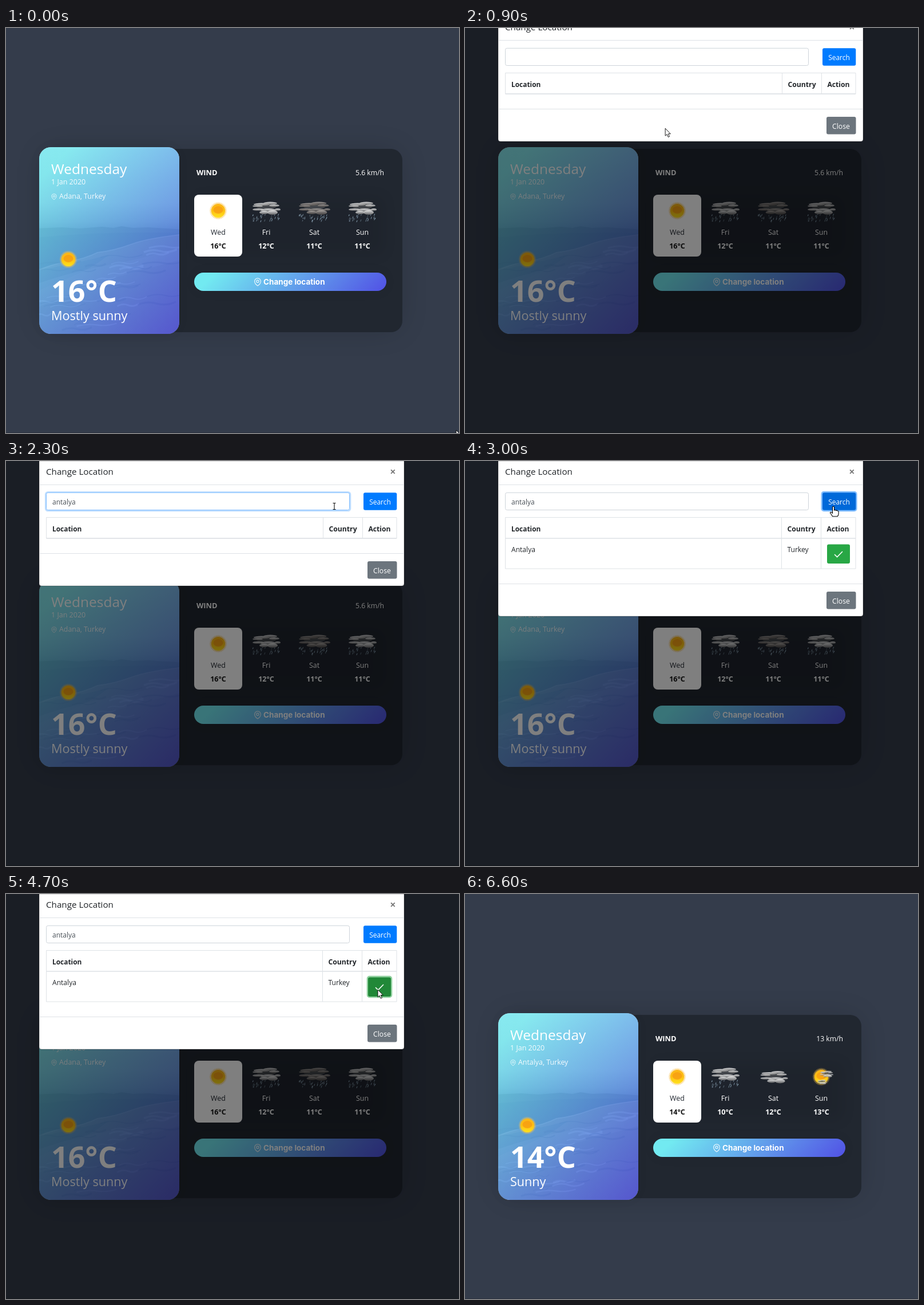
An HTML page for the animation above (6700 ms loop, 792 px wide and 707 px high).

```html
<!DOCTYPE html>
<html lang="en">
<head>
<meta charset="utf-8">
<title>Weather card</title>
<style>
html, body { margin: 0; width: 100%; height: 100%; overflow: hidden; background: #343c4b; }
svg { display: block; }
text { font-family: "Open Sans", "Noto Sans", sans-serif; white-space: pre; }
.b { font-weight: 700; }
.m { text-anchor: middle; }
.e { text-anchor: end; }
</style>
</head>
<body>
<svg id="stage" width="792" height="707" viewBox="0 0 792 707"></svg>
<script>
const LOOP = 6700, STEP = 100;
const stage = document.getElementById('stage');

// ---------- helpers ----------
const clamp = v => Math.max(0, Math.min(1, v));
const ease = v => { v = clamp(v); return v * v * (3 - 2 * v); };
const range = (n, f) => Array.from({ length: n }, (_, i) => f(i)).join('');
function seeded(s) {
  return () => (s = (s * 16807) % 2147483647) / 2147483647;
}
const text = (x, y, size, str, fill = '#fff', cls = '', more = '') =>
  `<text x="${x}" y="${y}" font-size="${size}" fill="${fill}" class="${cls}" ${more}>${str}</text>`;
const box = (x, y, w, h, r, fill, more = '') =>
  `<rect x="${x}" y="${y}" width="${w}" height="${h}" rx="${r}" fill="${fill}" ${more}/>`;
const line = (d, stroke = '#dee2e6', w = 1, more = '') =>
  `<path d="${d}" fill="none" stroke="${stroke}" stroke-width="${w}" ${more}/>`;
const oval = (x, y, rx, ry, fill, more = '') =>
  `<ellipse cx="${x}" cy="${y}" rx="${rx}" ry="${ry}" fill="${fill}" ${more}/>`;
const pin = (x, y, s) => `<g transform="translate(${x} ${y}) scale(${s})" fill="none" stroke="#fff" stroke-width="2" opacity=".85">
  <path d="M21 10c0 7-9 13-9 13s-9-6-9-13a9 9 0 0 1 18 0z"/><circle cx="12" cy="10" r="3.5"/></g>`;

// ---------- weather icons ----------
function sun(x, y) {
  const rays = range(32, i => {
    const a = i * Math.PI / 16;
    return `M${x + 12 * Math.cos(a)} ${y + 12 * Math.sin(a)}L${x + 14.3 * Math.cos(a)} ${y + 14.3 * Math.sin(a)}`;
  });
  return oval(x, y, 16, 16, 'url(#glow)') + line(rays, '#f6b93c', 1, 'opacity=".6"') +
    oval(x, y, 12, 12, 'url(#sun)') +
    oval(x, y - 1.5, 8.5, 6.5, '#f79a12', 'opacity=".75" filter="url(#soft)"');
}

// thin streaks of vapour: x, y, rx, ry
const PUFFS = [[0, -2, 17, 4], [-8, -6, 14, 2.5], [7, -8, 12, 2.5], [14, -4, 9, 2], [-15, -3, 9, 1.6],
  [-14, 3, 10, 2], [4, 4, 14, 3], [-4, 8, 8, 3], [11, 8, 9, 4], [20, 3, 5, 2]];
const cloud = (x, y, sx = 1, sy = 1, fill = 'puff') =>
  `<g transform="translate(${x} ${y}) scale(${sx} ${sy})" filter="url(#soft)">` +
  PUFFS.map((p, i) => oval(...p, i ? `url(#${fill})` : '#4b4d50', 'opacity=".85"')).join('') + '</g>';

function rain(x, half, seed) {
  const rnd = seeded(seed);
  return range(32, () => {
    const px = x + (rnd() * 2 - 1) * half, py = 324 + rnd() * 12, len = 2 + rnd() * 2.5;
    return line(`M${px} ${py}l${-len * .35} ${len}`, '#9fbace', .9, `opacity="${.35 + rnd() * .6}"`);
  });
}

const ICONS = {
  sun: x => sun(x, 319),
  rain: x => rain(x, 23, 77) + cloud(x, 314),
  storm: x => rain(x, 26, 191) + cloud(x, 314, 1.12, 1, 'gloom'),
  cloud: x => cloud(x + 1, 319, .98, .95),
  partly: x => sun(x, 319) + cloud(x + 9, 314, .48, .5) + cloud(x + 1, 328, .35, .35)
};

// ---------- page ----------
function photo() {
  const rnd = seeded(4242);
  const waves = range(44, i => {
    const x = 50 + rnd() * 200, y = 412 + i * 2.9 - (x - 58) * .16, w = 25 + rnd() * 50;
    return line(`M${x} ${y}q${w * .25} ${-4 - rnd() * 3} ${w * .5} -2t${w * .5} -3`,
      i % 2 ? '#dce6f0' : '#182840', 1 + rnd() * 2.5, 'opacity=".35"');
  });
  return `<g clip-path="url(#card)">
    <rect x="58" y="208" width="246" height="326" fill="url(#sky)"/>
    <g filter="url(#soft)">
    <path d="M50 350l48 -2 30 2 40 -3 20 2 14 -3 20 3 26 -1 65 4V544H50z" fill="#3a5560"/>
    <path d="M50 366Q180 354 314 358V544H50z" fill="#2b4858"/>
    <path d="M314 359Q248 366 218 377T160 391Q138 402 108 407T50 424V544H314z" fill="#686b70"/>
    <path d="M50 426Q90 416 120 410T180 396Q150 420 110 436T50 462z" fill="#3c5563" opacity=".7"/>
    <path d="M50 448Q120 424 178 414T314 380V402Q230 425 190 436T50 490z" fill="#85888e" opacity=".5"/>
    ${line('M304 361Q248 367 218 378T160 392Q138 403 108 408T58 423', '#e4edf2', 1.5, 'opacity=".25"')}
    ${waves}</g>
    <rect x="58" y="208" width="246" height="326" fill="url(#tint)" opacity=".8"/></g>`;
}

function weather(id, place, wind, sky, days) {
  const names = ['Wed', 'Fri', 'Sat', 'Sun'];
  return `<g id="${id}">` +
    text(93, 297.5, 12.4, place + ', Turkey', '#fff', '', 'opacity=".92"') +
    text(79, 478, 52, days[0][1] + '°C', '#fff', 'b') +
    text(79, 510, 21.6, sky) +
    text(661, 257, 12.2, wind + ' km/h', '#fff', 'e') +
    days.map(([icon, temp], i) => {
      const x = 371 + 84 * i, ink = i ? '#fff' : '#222831';
      return ICONS[icon](x) + text(x, 360.5, 12.4, names[i], ink, 'm') +
        text(x, 384.7, 12.5, temp + '°C', i ? '#fff' : '#111', 'b m');
    }).join('') + '</g>';
}

function table(id, shift, row) {
  const c1 = 554.5 - shift, c2 = 623.5 - shift, end = 135 + row, close = 175 + row;
  const result = row ? text(81, 159, 12.1, 'Antalya', '#212529') + text(c1 + 10, 159, 12.1, 'Turkey', '#212529') +
    box(631.7, 143.7, 42.6, 36.6, 4, '#28a745', 'id="okRing" opacity=".5" stroke="#28a745" stroke-width="2"') +
    box(633, 145.5, 40, 33.5, 3, '#28a745', 'id="ok"') +
    line('M646 163l4.6 4.6 9.4 -9.6', '#fff', 1.5) : '';
  return `<g id="${id}">` +
    `<path d="M58 0H696V${214 + row}q0 4 -4 4H62q-4 0 -4 -4z" fill="#fff" stroke="#0004"/>` +
    line(`M70.5 98.5H683V${end}H70.5zM${c1} 98.5V${end}M${c2} 98.5V${end}`) +
    line('M70.5 135H683', '#dee2e6', 1.6) +
    line(`M58 ${161.5 + row}H696`) +
    text(81, 122.5, 11.9, 'Location', '#212529', 'b') +
    text(c1 + 10, 122.5, 12.2, 'Country', '#212529', 'b') +
    text(c2 + 10, 122.5, 12.1, 'Action', '#212529', 'b') + result +
    box(632, close, 51.5, 30.5, 3, '#6c757d') +
    text(657.5, close + 20.7, 12.2, 'Close', '#fff', 'm') + '</g>';
}

const ramp = (id, stops, more = '') => `<linearGradient id="${id}" ${more}>` +
  stops.map(([o, c]) => `<stop offset="${o}" stop-color="${c}"/>`).join('') + '</linearGradient>';
const DOWN = 'x2="0" y2="1"', BLUES = [[.1, '#72eaf1'], [1, '#5151e5']];

stage.innerHTML = `<defs>
  ${ramp('tint', BLUES, 'gradientUnits="userSpaceOnUse" x1="37.75" y1="228.25" x2="323.25" y2="513.75"')}
  ${ramp('btn', BLUES, 'gradientUnits="userSpaceOnUse" x1="405" y1="351" x2="589" y2="535"')}
  ${ramp('sky', [[0, '#dde6ea'], [.3, '#b5c4cc'], [.4, '#8099a4'], [.44, '#5b7884']], DOWN)}
  ${ramp('sun', [[0, '#fbb517'], [.5, '#fdc013'], [1, '#ffe21c']], DOWN)}
  ${ramp('puff', [[0, '#f0f0f0'], [.5, '#bdbdbd'], [1, '#6c6c6c']], DOWN)}
  ${ramp('gloom', [[0, '#b9b4b0'], [.5, '#7d7875'], [1, '#4b4745']], DOWN)}
  <radialGradient id="glow"><stop offset=".7" stop-color="#ffc64e" stop-opacity=".55"/>
    <stop offset="1" stop-color="#ffc64e" stop-opacity="0"/></radialGradient>
  <filter id="soft"><feGaussianBlur stdDeviation=".6"/></filter>
  <filter id="far" x="-30%" y="-60%" width="160%" height="220%"><feGaussianBlur stdDeviation="26"/></filter>
  <filter id="near" x="-30%" y="-150%" width="160%" height="400%"><feGaussianBlur stdDeviation="12"/></filter>
  <clipPath id="card"><rect x="58" y="208" width="245" height="326" rx="20.4"/></clipPath>
</defs>
${box(0, 0, 792, 707, 0, '#343c4b')}
${box(0, 706, 792, 1, 0, '#2a303c')}
${box(69, 219, 616, 304, 16, '#000', 'opacity=".2" filter="url(#far)"')}
${box(61, 211, 632, 320, 20, '#212730')}
${box(66, 216, 229, 310, 16, '#000', 'opacity=".15" filter="url(#near)"')}
${photo()}
${text(79, 255, 24.5, 'Wednesday')}
${text(79, 273, 12.5, '1 Jan 2020', '#fff', '', 'opacity=".92"')}
${pin(78.6, 289.3, .45)}
${sun(109, 404)}
${text(333, 256.8, 12.8, 'WIND', '#fff', 'b')}
${box(333, 295, 328, 100, 8, '#000', 'opacity=".08" filter="url(#near)"')}
${box(329, 291, 84, 108, 8, '#fff')}
${weather('before', 'Adana', '5.6', 'Mostly sunny', [['sun', 16], ['rain', 12], ['storm', 11], ['rain', 11]])}
${weather('after', 'Antalya', '13', 'Sunny', [['sun', 14], ['rain', 10], ['cloud', 12], ['partly', 13]])}
<g id="change">
  ${box(333, 431, 328, 24, 12, '#000', 'opacity=".1" filter="url(#near)"')}
  ${box(329, 427, 336, 32, 16, 'url(#btn)')}
  ${pin(432.8, 436.3, .6)}
  ${text(450, 448, 13.5, 'Change location', '#fff', 'b', 'style="font-family:Inter,sans-serif"')}
</g>
${box(332.5, 427.5, 329, 32, 0, 'none', 'id="outline" stroke="#ddd" stroke-dasharray="1 1"')}
${box(0, 0, 792, 707, 0, '#000', 'id="shade"')}
<g id="modal">
  ${table('empty', 0, 0)}
  ${table('found', 1, 53)}
  ${text(70, 24, 15.2, 'Change Location', '#212529')}
  ${text(676.3, 25.2, 18, '×', '#7a7a7a', 'b m')}
  ${line('M58 41.5H696')}
  ${box(69.2, 54.2, 532.8, 32.8, 4, 'none', 'id="inputRing" stroke="#bfdeff" stroke-width="2.6"')}
  ${box(70.5, 55.3, 530, 30.2, 3, '#fff', 'id="input"')}
  ${text(81, 76, 12, '', '#495057', '', 'id="typed"')}
  ${line('M0 64V79', '#222', 1, 'id="caret"')}
  ${box(622.5, 52.8, 63, 35.4, 5, '#80bdff', 'id="searchRing"')}
  ${box(625, 55.3, 58.3, 30.4, 3, '#007bff', 'id="search"')}
  ${text(654, 76, 12, 'Search', '#fff', 'm')}
</g>
<g id="cursor">
  <path id="arrow" d="M0 0V13L3 10.4 5.2 15.3 7.4 14.3 5.2 9.6H9.2z" fill="#fff" stroke="#000" stroke-width=".9"/>
  <path id="hand" d="M-1.5 1.3q1.5 -2.2 3 0V7q1.7 -1.2 2.9 .4 1.7 -.9 2.7 .6 1.8 -.4 2 1.5V13q0 3 -2 4.8H-1.5Q-3 15 -5.6 11.5q.6 -2.4 3 -.4l1.1 1z" fill="#fff" stroke="#000" stroke-width="1.1"/>
  <path id="beam" d="M-2.5 -5.5h2q.5 0 .5 .7 0 -.7 .5 -.7h2M0 -5V5M-2.5 5.5h2q.5 0 .5 -.7 0 .7 .5 .7h2" fill="none" stroke="#111" stroke-width="1.1"/>
</g>`;

// ---------- motion ----------
const el = {};
stage.querySelectorAll('[id]').forEach(n => el[n.id] = n);
const show = (id, on) => el[id].setAttribute('display', on ? 'inline' : 'none');
const set = (id, name, v) => el[id].setAttribute(name, v);

// start, end, destination of each pointer move
const MOVES = [[0, 600, 519, 450], [700, 1000, 291, 79], [1800, 2500, 644, 79], [3200, 3900, 650, 167]];
function pointer(t) {
  let x = 787, y = 702;
  for (const [a, b, px, py] of MOVES) {
    const k = ease((t - a) / (b - a));
    x += (px - x) * k;
    y += (py - y) * k;
  }
  return [x, y];
}
const inside = (x, y, l, top, r, bottom) => x >= l && x <= r && y >= top && y <= bottom;

function draw(t) {
  const [x, y] = pointer(t);
  const open = t >= 800 && t < 4900, found = t >= 2700, chosen = t >= 4700;
  const focus = t >= 1000 && t < 2600, pressed = t >= 600 && t < 800;
  const overSearch = open && inside(x, y, 625, 55, 683, 86);
  const overOk = open && found && inside(x, y, 633, 145, 673, 179);

  show('before', t < 4800);
  show('after', t >= 4800);
  set('change', 'transform', pressed ? 'translate(497 443) scale(.98) translate(-497 -443)' : '');
  show('outline', pressed);
  set('shade', 'opacity', .5 * Math.min(clamp((t - 630) / 150), clamp((5050 - t) / 150)));

  const slide = t < 2000 ? 1 - ease((t - 750) / 300) : ease((t - 4700) / 300);
  show('modal', open);
  set('modal', 'opacity', Math.min(clamp((t - 750) / 150), clamp((4880 - t) / 150)));
  set('modal', 'transform', `translate(0 ${-40 * slide})`);
  show('empty', !found);
  show('found', found);

  show('inputRing', focus);
  set('input', 'stroke', focus ? '#80bdff' : '#ced4da');
  el.typed.textContent = 'antalya'.slice(0, Math.max(0, Math.floor((t - 900) / 100)));
  show('caret', focus && t < 2100);
  if (focus) set('caret', 'transform', `translate(${Math.round(81 + el.typed.getComputedTextLength()) + .5} 0)`);

  show('searchRing', t >= 2600 && !chosen);
  set('search', 'fill', overSearch ? '#0069d9' : '#007bff');
  show('okRing', chosen);
  set('ok', 'fill', overOk ? '#218838' : '#28a745');

  const beam = open && inside(x, y, 70, 55, 601, 86);
  const hand = !beam && !chosen && (overSearch || overOk || t < 700 && inside(x, y, 329, 427, 665, 459));
  show('cursor', t < 5700);
  set('cursor', 'transform', `translate(${x} ${y})`);
  show('beam', beam);
  show('hand', hand);
  show('arrow', !beam && !hand);
}

const start = performance.now();
function tick(now) {
  const t = Math.max(0, now - start) % LOOP;
  draw(Math.floor(t / STEP) * STEP);
  requestAnimationFrame(tick);
}
draw(0);
requestAnimationFrame(tick);
</script>
</body>
</html>
```
